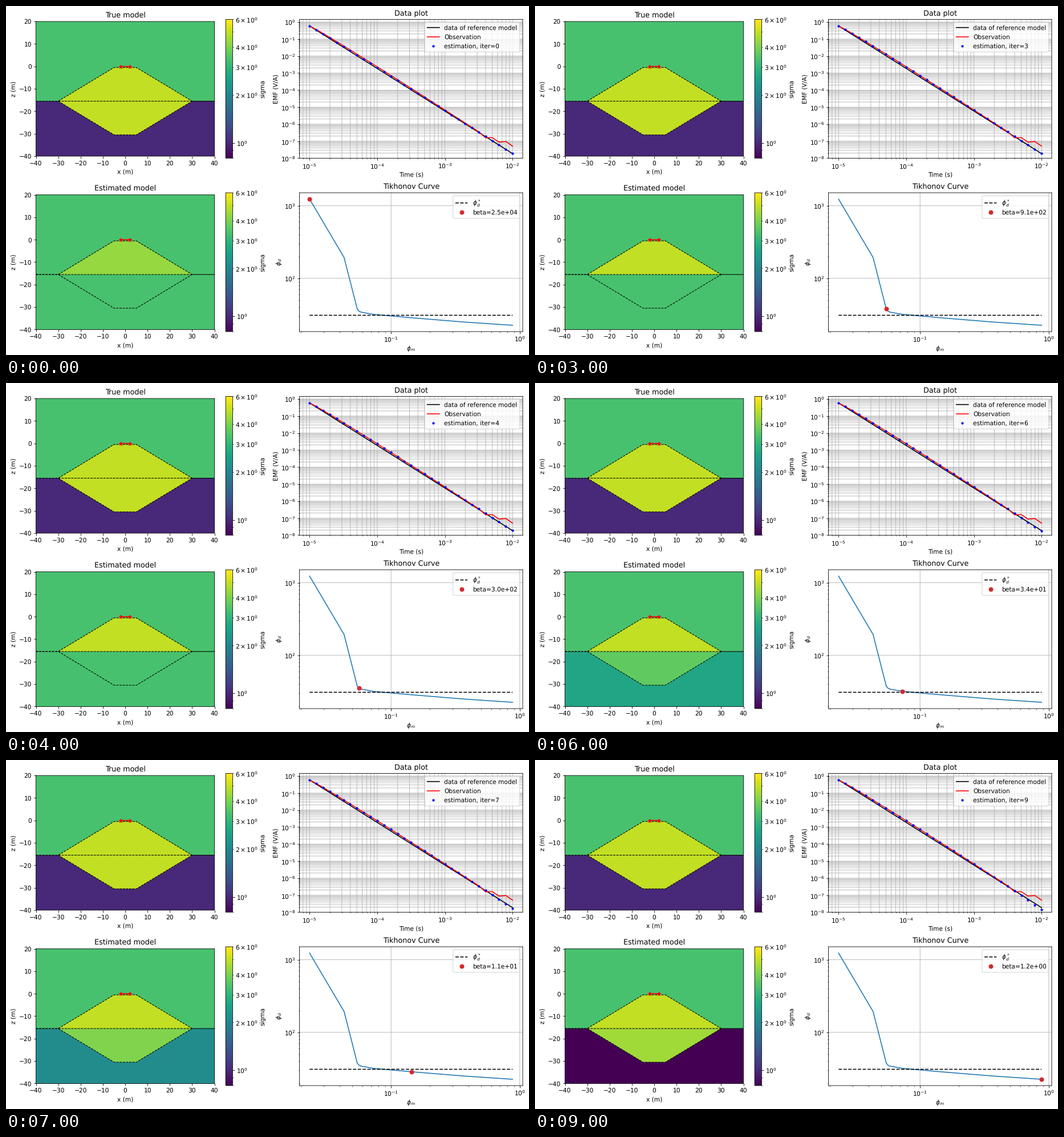
A matplotlib script for the animation above (10 s loop, 917 by 611 pixels).

```python
import numpy as np
import matplotlib.pyplot as plt
from matplotlib.animation import FuncAnimation
from matplotlib.cm import ScalarMappable
from matplotlib.colors import LogNorm

W, H, DPI = 917, 611, 76.4
plt.rcParams.update({"font.family": "DejaVu Sans", "text.hinting": "none", "path.snap": False})
fig = plt.figure(figsize=((W + 1e-3) / DPI, (H + 1e-3) / DPI), dpi=DPI, facecolor="white")

norm = LogNorm(0.8, 6)
cmap = plt.get_cmap("viridis")

# conductivities per iteration
STEPS = np.arange(10)
GAP = 0.37 ** STEPS
BACKGROUND = 1 / 0.3
UPPER = 5 - 0.65 * GAP
LOWER = [BACKGROUND] * 5 + [3.3, 3.68, 4.08, 4.4, 4.5]
GROUND = [BACKGROUND] * 4 + [3.31, 2.95, 2.62, 2.12, 1.32, 0.8]
BETA = 24600 / 3.0 ** STEPS

# misfit curve, log10 of model norm and data misfit
PHI_M = 10 ** np.array([-1.633, -1.365, -1.285, -1.263, -1.251,
                        -1.234, -1.136, -0.839, -0.429, -0.056])
PHI_D = 10 ** np.array([3.091, 2.287, 1.732, 1.579, 1.550,
                        1.535, 1.504, 1.457, 1.398, 1.354])

# math text carries a pixel of padding, so its gaps are one pixel (in points) tighter
PIXEL = 72 / DPI
TICK_PAD = 3.5 - PIXEL
LABEL_PAD = 4 - PIXEL


def axes(x, y, w, h):
    """Axes from a pixel box measured from the top left corner."""
    return fig.add_axes([x / W, 1 - (y + h) / H, w / W, h / H])


def color(sigma):
    return cmap(norm(sigma))


def model(top, title):
    ax = axes(52.5, top + 3.6, 313, 235.8)
    ax.set(xlim=(-40, 40), ylim=(-40, 20), title=title, xlabel="x (m)", ylabel="z (m)",
           xticks=range(-40, 41, 10), yticks=range(-40, 21, 10))
    ax.set_facecolor(color(BACKGROUND))

    def block(xs, zs):
        return ax.fill(xs, zs, lw=0, zorder=1)[0]

    side = [-30, -5, 5, 30]
    crest = [-15.5, -0.5, -0.5, -15.5]
    keel = [-15.5, -30.5, -30.5, -15.5]
    parts = [block([-40, 40, 40, -40], [-15.5, -15.5, -40, -40]),
             block(side, keel), block(side, crest)]

    ax.plot([-40] + side, [-15.5] + crest, "k--", lw=1)
    ax.plot([-40, 30], [-15.5, -15.5], "k--", lw=1)
    ax.plot([30, 40], [-15.5, -15.5], "k-", lw=1)
    ax.plot(side, keel, "k--", lw=1)
    ax.plot([-2, 2], [0, 0], "r-*")

    bar = fig.colorbar(ScalarMappable(norm, cmap), cax=axes(385.2, top, 12.2, 243))
    bar.ax.tick_params(which="both", pad=TICK_PAD)
    bar.set_label("sigma", labelpad=LABEL_PAD)
    return parts


def paint(parts, *sigmas):
    for part, sigma in zip(parts, sigmas):
        part.set_facecolor(color(sigma))


def log_axes(top, title, xlabel, ylabel, pad):
    ax = axes(514.5, top, 391.5, 243)
    ax.set_title(title)
    ax.set_xlabel(xlabel, labelpad=pad)
    ax.set_ylabel(ylabel, labelpad=pad)
    ax.tick_params(which="both", pad=TICK_PAD)
    return ax


true_parts = model(23.5, "True model")
paint(true_parts, 1, 5, 5)
est_parts = model(327, "Estimated model")

# decay curves, u counts decades after the first time
u = np.linspace(0, 3, 31)
times = 10 ** (u - 5)
ref = -0.23 - 2.5 * u
bump = 0.1 * np.sin(np.pi * (u / 3) ** 0.6)
obs = ref + bump
obs[-5:] = [-6.795, -6.79, -7.05, -7.015, -7.292]


def estimate(i):
    drop = 0.032 * max(0, i - 5)
    return 10 ** (ref + bump * (1 - 0.5 * GAP[i]) - drop * (u / 3) ** 8)


ax = log_axes(23.5, "Data plot", "Time (s)", "EMF (V/A)", LABEL_PAD)
ax.loglog(times, 10 ** ref, "k", label="data of reference model")
ax.loglog(times, 10 ** obs, "r", label="Observation")
dots, = ax.loglog(times, estimate(0), "b.", ms=6, label="estimation, iter=0")
ax.set_ylim(1e-8, 10 ** 0.153)
ax.grid(True, which="both")
data_text = ax.legend(loc="upper right", labelspacing=0.54).get_texts()[2]

ax = log_axes(327, "Tikhonov Curve", r"$\phi_m$", r"$\phi_d$", LABEL_PAD - PIXEL)
ax.loglog(PHI_M, PHI_D, "C0")
ax.loglog(PHI_M[[0, -1]], [31, 31], "k--", label=r"$\phi_d^*$")
ball, = ax.loglog(PHI_M[:1], PHI_D[:1], "o", color="C3", ms=6.5, label="beta=2.5e+04")
ax.set_xlim(ax.get_xlim())
ax.set_ylim(ax.get_ylim())
ax.grid(True)
beta_text = ax.legend(loc="upper right", labelspacing=0.3).get_texts()[1]


def draw(i):
    paint(est_parts, GROUND[i], LOWER[i], UPPER[i])
    dots.set_ydata(estimate(i))
    data_text.set_text(f"estimation, iter={i}")
    ball.set_data([PHI_M[i]], [PHI_D[i]])
    beta_text.set_text(f"beta={BETA[i]:.1e}")
    return []


anim = FuncAnimation(fig, draw, frames=10, interval=1000, repeat=True, repeat_delay=0)
plt.show()
```
